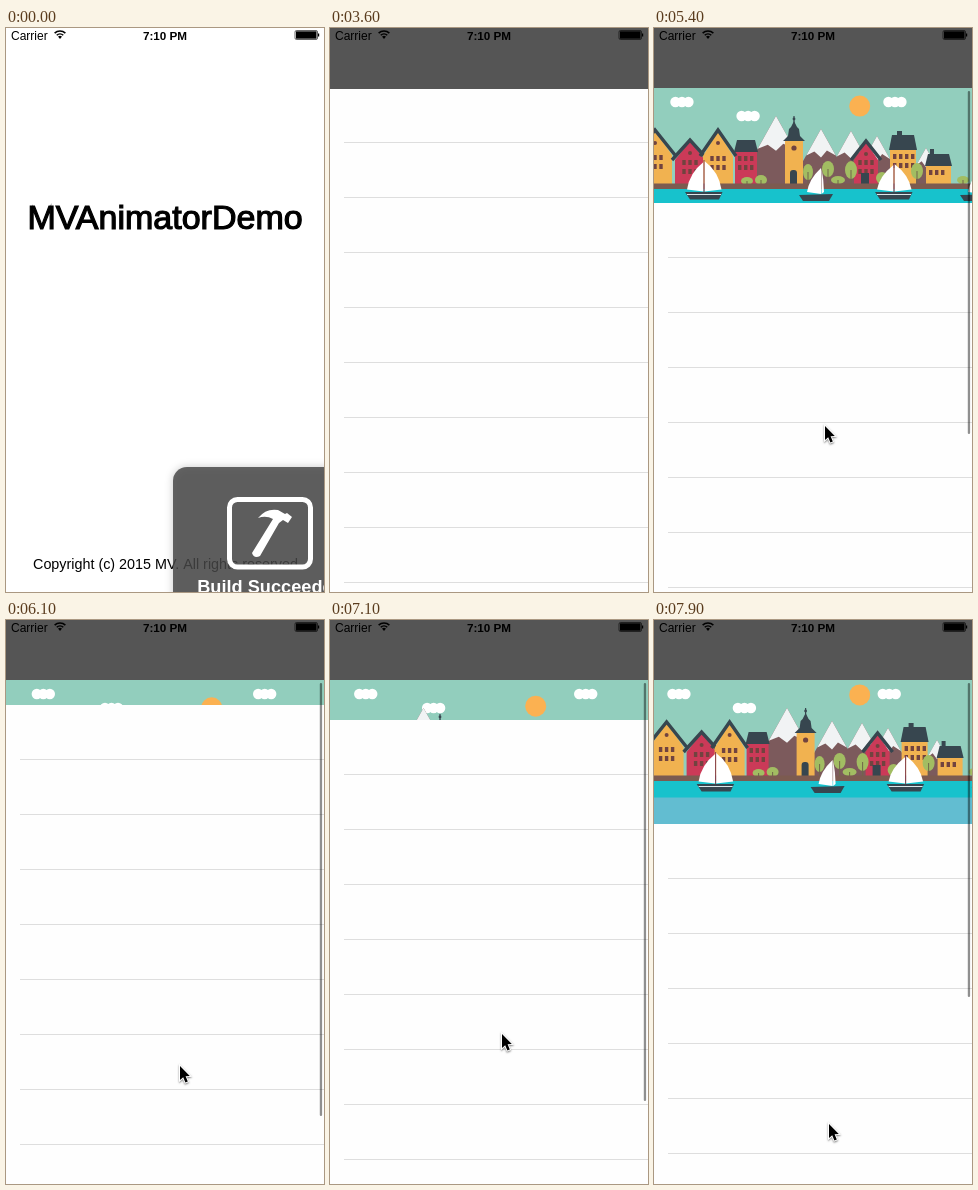
These frames come from a looping animation (318x564 px, 8000 ms). An HTML page with a canvas:

```html
<!DOCTYPE html>
<html lang="en">
<head>
<meta charset="utf-8">
<title>Pull-down banner</title>
<style>
html, body { margin: 0; width: 100%; height: 100%; overflow: hidden; background: #fff; }
canvas { display: block; }
</style>
</head>
<body>
<canvas id="stage"></canvas>
<script>
const W = 318, H = 564, TOP = 60, LOOP = 8000, STEP = 100;
const SANS = '"Liberation Sans", Arial, sans-serif';
const YELLOW = '#f1b250', RED = '#cb3a58', SLATE = '#37464f', BROWN = '#7c5a5c',
      GREEN = '#a2bd62', SKY = '#92cebd', SNOW = '#f1f3f4';

const canvas = document.getElementById('stage');
const c = canvas.getContext('2d');
const ratio = window.devicePixelRatio || 1;
canvas.width = W * ratio;
canvas.height = H * ratio;
canvas.style.width = W + 'px';
canvas.style.height = H + 'px';

// time, pull distance, pointer x, pointer y
const keys = [
  [3700, 0, 203, 346], [4400, 0, 170, 130], [4900, 52, 169, 235],
  [5400, 115, 171, 398], [5700, 143, 173, 503], [5900, 95, 174, 505],
  [6100, 25, 174, 446], [6300, 0, 172, 140], [6400, 0, 171, 135],
  [6800, 140, 172, 490], [7000, 80, 172, 480], [7100, 40, 172, 414],
  [7300, 3, 172, 140], [7400, 0, 172, 135], [7900, 144, 175, 504]
];

function pose(t) {
  const i = keys.findIndex(k => k[0] >= t);
  if (i === 0) return keys[0];
  const a = keys[i - 1], b = keys[i], p = (t - a[0]) / (b[0] - a[0]);
  return a.map((v, n) => v + (b[n] - v) * p);
}

function rect(x, y, w, h, color) {
  c.fillStyle = color;
  c.fillRect(x, y, w, h);
}

function poly(color, ...pts) {
  c.fillStyle = color;
  c.beginPath();
  for (let i = 0; i < pts.length; i += 2) c.lineTo(pts[i], pts[i + 1]);
  c.closePath();
  c.fill();
}

function oval(x, y, rx, ry, color) {
  c.fillStyle = color;
  c.beginPath();
  c.ellipse(x, y, rx, ry, 0, 0, Math.PI * 2);
  c.fill();
}

function text(str, x, y, size, weight = 400, align = 'left', color = '#000') {
  c.font = `${weight} ${size}px ${SANS}`;
  c.textAlign = align;
  c.fillStyle = color;
  c.fillText(str, x, y);
}

function moved(x, y, draw) {
  c.save();
  c.translate(x, y);
  draw();
  c.restore();
}

function statusBar() {
  text('Carrier', 5, 11.5, 12);
  text('7:10 PM', 159, 11.5, 11.7, 700, 'center');
  c.strokeStyle = '#000';
  c.lineWidth = 1.5;
  for (const r of [4.6, 7.6]) {
    c.beginPath();
    c.arc(54, 10.5, r, -Math.PI * 0.75, -Math.PI * 0.25);
    c.stroke();
  }
  poly('#000', 54, 11, 52, 8.6, 54, 7.8, 56, 8.6);
  c.lineWidth = 0.6;
  c.beginPath();
  c.roundRect(289, 2.5, 22.5, 9, 1.5);
  c.stroke();
  rect(290, 3.3, 20.5, 7.4, '#000');
  rect(312, 5.5, 1.2, 3, '#000');
}

function bezel() {
  c.save();
  c.shadowColor = 'rgba(0,0,0,.25)';
  c.shadowBlur = 8 * ratio;
  c.fillStyle = 'rgba(72,72,72,.83)';
  c.beginPath();
  c.roundRect(167, 439, 194, 190, 14);
  c.fill();
  c.restore();
  c.strokeStyle = '#fff';
  c.lineWidth = 5;
  c.beginPath();
  c.roundRect(223.5, 471.5, 81, 67.5, 8);
  c.stroke();
  c.fillStyle = '#fff';
  c.beginPath();
  c.moveTo(252, 490);
  c.quadraticCurveTo(260, 480, 272, 482);
  c.lineTo(279, 486);
  c.lineTo(281, 485);
  c.lineTo(286, 489);
  c.lineTo(282, 495);
  c.lineTo(277, 492);
  c.lineTo(273, 495);
  c.lineTo(254, 528);
  c.quadraticCurveTo(248, 531, 246, 525);
  c.lineTo(267, 491);
  c.quadraticCurveTo(260, 487, 252, 490);
  c.fill();
  text('Build Succeeded', 264.5, 565, 18.2, 700, 'center', '#fff');
}

function splash() {
  rect(0, 0, W, H, '#fff');
  text('MVAnimatorDemo', 159, 200.5, 34, 400, 'center');
  c.strokeStyle = '#000';
  c.lineWidth = 1.2;
  c.strokeText('MVAnimatorDemo', 159, 200.5);
  text('Copyright (c) 2015 MV. All rights reserved.', 161.5, 540.5, 14.35, 400, 'center');
  bezel();
}

function cloud(x, y) {
  for (const d of [-6.5, 0, 6.5]) oval(x + d, y, 5.2, 5.2, '#fff');
}

function mountain(x, top) {
  const base = 156, h = base - top, cap = h * 0.48;
  poly(BROWN, x, top, x + h * 0.56, base, x - h * 0.56, base);
  const w = cap * 0.56;
  poly(SNOW, x, top, x + w, top + cap, x + w * 0.4, top + cap - 5, x, top + cap + 2,
    x - w * 0.45, top + cap - 4, x - w, top + cap);
}

function windows(x, y, cols, rows) {
  for (let i = 0; i < cols; i++)
    for (let j = 0; j < rows; j++) rect(x + i * 6, y + j * 9, 3.4, 5, '#71433f');
}

function gable(x, top, half, eaves, color) {
  poly(color, x, top + 3, x + half - 3, eaves, x + half - 3, 156, x - half + 3, 156, x - half + 3, eaves);
  c.strokeStyle = SLATE;
  c.lineWidth = 3.4;
  c.beginPath();
  c.moveTo(x - half, eaves);
  c.lineTo(x, top + 2);
  c.lineTo(x + half, eaves);
  c.stroke();
  oval(x, top + 15, 2, 2, '#71433f');
  windows(x - 7.7, eaves, 3, 2);
}

function block(x, y, w, roof, color) {
  rect(x + 1, y + roof, w - 2, 156 - y - roof, color);
  poly(SLATE, x + 3, y, x + w - 3, y, x + w, y + roof, x, y + roof);
  windows(x + 4, y + roof + 4, Math.floor(w / 7), y < 120 ? 2 : 1);
}

function tower() {
  rect(131, 112, 18, 44, YELLOW);
  rect(139.4, 88, 1.2, 8, SLATE);
  oval(140, 91, 1.4, 1.4, SLATE);
  poly(SLATE, 140, 93, 143, 99, 145, 101, 146, 108, 151, 113, 129, 113, 134, 108, 135, 101, 137, 99);
  oval(140, 120, 2.6, 2.6, '#71433f');
  c.fillStyle = SLATE;
  c.beginPath();
  c.roundRect(136, 142, 7, 14, [3, 3, 0, 0]);
  c.fill();
}

function tree(x, y, rx, ry) {
  oval(x, y, rx, ry, GREEN);
  rect(x - 0.5, y, 1, 156 - y, '#71664a');
}

function sail(x, top, foot, width) {
  c.fillStyle = '#fff';
  c.beginPath();
  c.moveTo(x, top);
  c.quadraticCurveTo(x + width * 0.85, top + 11, x + width, foot - 2);
  c.lineTo(x, foot);
  c.fill();
}

function boat(x, top) {
  sail(x - 0.5, top + 1, 163.5, -16.5);
  sail(x + 0.5, top, 163.5, 17);
  rect(x - 0.5, top - 1, 1, 34, '#843f4b');
  poly(SLATE, x - 19, 164, x + 18.5, 164, x + 15, 171.5, x - 14, 171.5);
  rect(x - 17, 166, 34, 1, '#dce7ea');
}

function town() {
  gable(1, 100, 20, 127, YELLOW);
  gable(36, 110, 18, 132, RED);
  block(80, 112, 24, 12, RED);
  gable(64, 100, 18, 128, YELLOW);
  tower();
  gable(212, 111, 15, 132, RED);
  rect(207, 145, 8, 11, SLATE);
  rect(243, 103, 5, 7, SLATE);
  block(235, 107, 28, 15, YELLOW);
  rect(276, 121, 4, 6, SLATE);
  block(271, 126, 27, 12, YELLOW);
  tree(174, 141, 6, 8);
  tree(197, 142, 6, 9);
  tree(154, 144, 5, 8);
  tree(263, 143, 6, 8);
  tree(228, 150, 6, 6);
  tree(184, 152, 7, 4);
  tree(107, 152, 6, 5);
  tree(93, 153, 6, 4);
  tree(309, 152, 6, 4);
}

function banner(off) {
  c.save();
  c.beginPath();
  c.rect(0, TOP, W, off);
  c.clip();
  rect(0, TOP, W, off, SKY);
  oval(205.7, 90.5 - off * 0.108, 10.5, 10.5, '#fbb151');
  cloud(39.9 - off * 0.104, 74);
  cloud(108.7 - off * 0.127, 88);
  cloud(263.6 - off * 0.197, 74);

  const shift = (off - 115) * 0.4, drop = Math.max(0, 115 - off) * 0.08;
  moved((off - 115) * 0.38, 0, () => {
    mountain(167, 101);
    mountain(197, 103);
    mountain(223, 108);
    mountain(272, 120);
    mountain(122, 88);
  });
  moved(shift, drop, town);
  rect(0, 155.5, W, 6, '#7c5b50');
  rect(0, 161, W, 17, '#17c2cc');
  rect(0, 177.5, W, 40, '#62bdd1');
  moved(shift, 0, () => {
    boat(50, 133);
    boat(240, 136);
    for (const x of [166, 327])
      moved(x, 0, () => {
        sail(1, 140, 166, -14);
        sail(1.5, 140, 166, 2.5);
        poly(SLATE, -21, 167, 13, 166, 9, 173, -17, 173);
      });
  });
  c.restore();
}

function list(off) {
  rect(0, 0, W, TOP + 1, '#555');
  rect(0, TOP + 1, W, H - TOP, '#fefefe');
  for (let y = 114 + off; y < H; y += 55) rect(14, Math.round(y), W - 14, 1, '#dedede');
  if (off > 0) banner(off);
}

function scrollBar(off) {
  c.fillStyle = 'rgba(0,0,0,.44)';
  c.beginPath();
  c.roundRect(313.8, 63, 2.3, 458 - off, 1.1);
  c.fill();
}

function pointer(x, y) {
  moved(x, y, () => {
    c.beginPath();
    [[0, 0], [0, 14], [3.2, 11.2], [5.4, 16.4], [7.8, 15.4], [5.6, 10.3], [9.8, 10]]
      .forEach(p => c.lineTo(...p));
    c.closePath();
    c.shadowColor = 'rgba(0,0,0,.5)';
    c.shadowBlur = 2 * ratio;
    c.shadowOffsetY = ratio;
    c.lineWidth = 2;
    c.strokeStyle = '#fff';
    c.stroke();
    c.shadowColor = 'transparent';
    c.fillStyle = '#000';
    c.fill();
  });
}

function draw(t) {
  const [, off, x, y] = pose(Math.max(t, keys[0][0]));
  c.setTransform(ratio, 0, 0, ratio, 0, 0);
  if (t < 700) splash();
  c.globalAlpha = Math.min(1, t / 680);
  list(off);
  c.globalAlpha = 1;
  statusBar();
  if (t >= 4500) scrollBar(off);
  if (t >= 3700) pointer(x, y);
}

const start = performance.now();
function tick() {
  const t = (performance.now() - start) % LOOP;
  draw(Math.floor(t / STEP) * STEP);
  requestAnimationFrame(tick);
}
tick();
</script>
</body>
</html>
```
